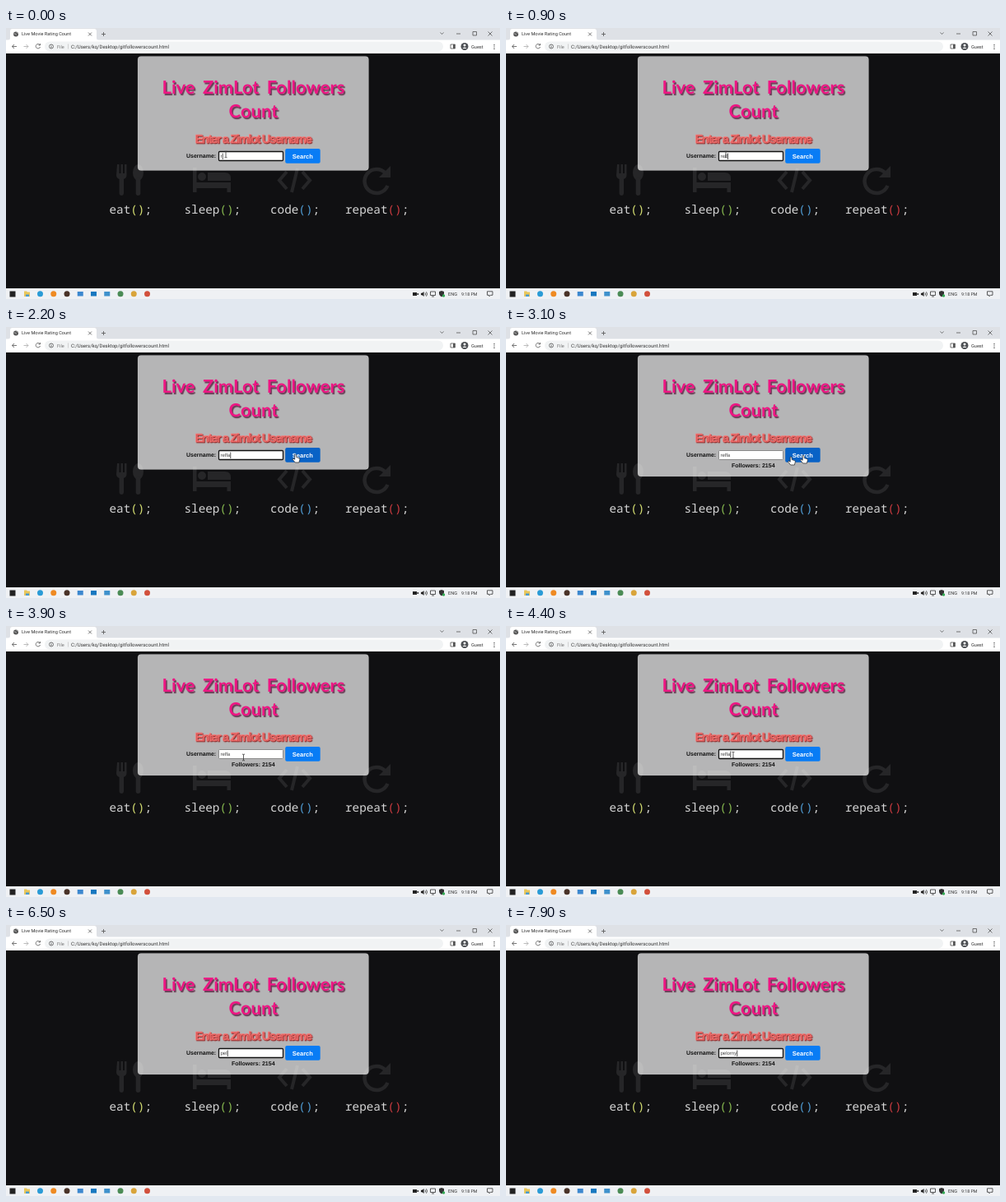
Recreate the animation shown at these times as an HTML page. Size 600 by 330 pixels, loop 8 s.

```html
<!DOCTYPE html>
<html lang="en">
<head>
<meta charset="utf-8">
<title>Followers count</title>
<style>
  html, body { margin: 0; width: 100%; height: 100%; overflow: hidden; background: #101012; }
  svg { display: block; width: 600px; height: 330px; text-rendering: geometricPrecision; }
  text { white-space: pre; }
  .ui { font: 5.6px Roboto, sans-serif; fill: #333; }
  .line { fill: none; stroke: #555; stroke-width: .8; }
  .title { font: 700 22px Lato, sans-serif; word-spacing: 4px; fill: #ee1583; text-anchor: middle;
           text-shadow: 1.5px 1.5px 1px #6a3a55; }
  .prompt { font: 700 14.5px "Liberation Sans", sans-serif; letter-spacing: -1.3px; fill: #ff7a78;
            stroke: #ff7a78; stroke-width: .4; text-shadow: 1px 1px 1px #8c2020; }
  .bold { font: 700 7px "Liberation Sans", sans-serif; fill: #111; }
  .typed { font: 6px "Liberation Sans", sans-serif; fill: #444; }
  .code { font: 14.3px "Noto Sans Mono", monospace; fill: #d6d6d6; }
  .icon { fill: #262628; }
  .stroke { fill: none; stroke: #262628; stroke-width: 4.5; }
</style>
</head>
<body>
<svg viewBox="0 0 600 330">
  <defs>
    <path id="hand" d="M-.8-4.5Q.2-5.4 1-4.3L1.3-1.4 4.5-.4Q5.6 0 5.3 1.4L4.4 5H-.3L-3.4 1.2Q-3.5 0-2.2.3L-.8 1.3Z"
      fill="#fff" stroke="#222" stroke-width=".7"/>
    <path id="beam" d="M-1.5-3.8H-.4L0-3.3.4-3.8H1.5M0-3.3V3.3M-1.5 3.8H-.4L0 3.3.4 3.8H1.5"
      fill="none" stroke="#333" stroke-width=".8"/>
  </defs>

  <!-- wallpaper -->
  <rect y="30" width="600" height="288" fill="#101012"/>
  <g class="icon">
    <path d="M135 166h2.5v11h2v-11h2.5v11h2v-11h2.5v13q0 4-3.5 5v17q0 3-2.7 3t-2.7-3v-17q-3.6-1-3.6-5Z"/>
    <ellipse cx="160.5" cy="176" rx="6.5" ry="10"/>
    <rect x="157.7" y="182" width="5.6" height="22" rx="2.7"/>
    <path d="M227 170h4.5v18h41.5v12h-4.5v-5h-37v5H227Z"/>
    <circle cx="238" cy="181" r="5"/>
    <path d="M245 176h21q7 0 7 7v3h-28Z"/>
    <path d="M467 168v14h-14Z"/>
  </g>
  <g class="stroke">
    <path d="M341 175l-9 10.500 9 10.500M360 175l9 10.500-9 10.500M354 171l-7 29" stroke-width="4"/>
    <path d="M461 177A14.5 14.5 0 1 0 463.5 192"/>
  </g>
  <g class="code">
    <text x="125.5" y="226">eat<tspan fill="#d5df72">()</tspan>;</text>
    <text x="216.5" y="226">sleep<tspan fill="#86b84f">()</tspan>;</text>
    <text x="321" y="226">code<tspan fill="#4f9bd2">()</tspan>;</text>
    <text x="412" y="226">repeat<tspan fill="#c93b40">()</tspan>;</text>
  </g>

  <!-- card -->
  <rect id="card" x="160" y="34.5" width="280.5" height="139" rx="4" fill="#fff" fill-opacity=".69"
    stroke="#fff" stroke-opacity=".2" stroke-width=".6"/>
  <text class="title" x="300.5" y="80.4">Live ZimLot Followers</text>
  <text class="title" x="300.5" y="109">Count</text>
  <text class="prompt" x="229.500" y="139.5">Enter a Zimlot Username</text>
  <text class="bold" x="219" y="158.2">Username:</text>
  <rect id="field" x="258.5" y="150.5" width="78" height="11" rx="1" fill="#fff"/>
  <rect id="selection" x="260.5" y="152.5" height="7.5" fill="#e2eefb"/>
  <text id="typed" class="typed" x="260.5" y="158.2"></text>
  <rect id="caret" y="152.5" width=".7" height="7.5"/>
  <rect id="button" x="339.2" y="147" width="42.5" height="17.8" rx="2"/>
  <text class="bold" x="347.8" y="158.5" style="font-size:7.5px;fill:#fff">Search</text>
  <text id="result" class="bold" x="274" y="171.3">Followers: 2154</text>

  <!-- browser -->
  <rect width="600" height="15" fill="#dee1e6"/>
  <path d="M2 15q3 0 3-3V4q0-3 3-3h99q3 0 3 3v8q0 3 3 3Z" fill="#fff"/>
  <rect y="14.5" width="600" height="16.5" fill="#fff"/>
  <rect x="47" y="16.5" width="484" height="12" rx="6" fill="#f1f3f4"/>
  <circle cx="12" cy="7.5" r="3" fill="#555"/>
  <path d="M9.5 7h2l1 1.5M12.5 5l2 1.5" stroke="#ddd" stroke-width=".7" fill="none"/>
  <g class="line">
    <path d="M100 5.5l4 4m0-4l-4 4M116 7.5h5m-2.500-2.500v5"/>
    <path d="M527.5 5.5l2 2 2-2M547 7h5M567 4.5h4.5v4.5H567ZM585.5 4.5l5 5m0-5l-5 5"/>
    <path d="M13 22.5H7.5m2.5-2.500l-2.500 2.500 2.500 2.500"/>
    <path d="M21.5 22.5H27m-2.500-2.500l2.500 2.500-2.500 2.500" stroke="#aaa"/>
    <path d="M41 20.5a2.7 2.7 0 1 0 .5 2.5M41.5 19v2h-2"/>
    <circle cx="55" cy="22.5" r="2.5"/><path d="M55 22v2M55 20.8v.5"/>
    <path d="M75.5 19.5v6" stroke="#bbb" stroke-width=".6"/>
    <path d="M540 20h5.5v5H540Z"/><path d="M544 20v5" stroke-width="2"/>
  </g>
  <circle cx="557" cy="22.5" r="4.5" fill="#4c4f53"/>
  <circle cx="557" cy="21" r="1.5" fill="#fff"/><path d="M554.3 25q2.7-3 5.4 0Z" fill="#fff"/>
  <path d="M593 20v6" stroke="#444" stroke-width="1.2" stroke-dasharray="1.2 1.2"/>
  <text class="ui" x="19" y="9.3">Live Movie Rating Count</text>
  <text class="ui" x="62" y="24.5" style="fill:#777">File</text>
  <text class="ui" x="79" y="24.5" style="font-size:6px">C:/Users/kq/Desktop/gitfollowerscount.html</text>
  <text class="ui" x="565" y="24.5">Guest</text>

  <!-- taskbar -->
  <rect y="317" width="600" height="13" fill="#eff1f4"/>
  <rect x="4.5" y="320.5" width="7" height="7" fill="#222"/>
  <path d="M22 320.5h3l1 1h3v5.5h-7Z" fill="#e8c65a"/>
  <path d="M24 324.5h4v2.500h-4Z" fill="#4b9bd0"/>
  <g id="apps"></g>
  <path d="M494 322h5v4h-5ZM499.5 323h1.5v2h-1.500Z" fill="#222"/>
  <path d="M504 322.7h1.5l2-1.7v6l-2-1.700H504Z" fill="#222"/>
  <g class="line" style="stroke:#333">
    <path d="M509 322.5q1 1.5 0 3M510.5 321.3q2 2.7 0 5.4"/>
    <path d="M515.5 321h6v4.5h-6ZM517 327h3"/>
    <path d="M584.5 320.8h6.5v4.5h-2.500l-1.500 1.500v-1.500h-2.500Z"/>
  </g>
  <path d="M526 321l3-1 3 1v3q-1 2.5-3 3.5-2-1-3-3.500Z" fill="#333"/>
  <circle cx="531.5" cy="326" r="1.7" fill="#32a852"/>
  <text class="ui" x="537" y="326">ENG</text>
  <text class="ui" x="553" y="326" style="font-size:5.3px">9:18 PM</text>

  <use id="trail" href="#hand" x="361" y="161"/>
  <use id="pointer"/>
</svg>
<script>
  const LOOP = 8000;
  const $ = id => document.getElementById(id);
  const show = (id, on) => $(id).setAttribute('visibility', on ? 'visible' : 'hidden');
  const set = (id, attrs) => { for (const k in attrs) $(id).setAttribute(k, attrs[k]); };

  const appColors = ['#2a9bd6', '#ef8a22', '#4a3328', '#3d88cf', '#1878c0', '#3f91cc', '#4b8b55', '#d9a43a', '#d2503c'];
  $('apps').innerHTML = appColors.map((fill, i) => {
    const x = 41.5 + i * 16.25;
    return i > 2 && i < 6
      ? `<rect x="${x - 3.5}" y="321" width="7" height="5.5" fill="${fill}"/>`
      : `<circle cx="${x}" cy="323.8" r="3.5" fill="${fill}"/>`;
  }).join('');

  const firstName = 'relfa', secondName = 'pelorny';
  const firstKeys = [0, 300, 600, 800, 1100];
  const secondKeys = [5700, 6000, 6300, 6700, 7100, 7400, 7700];
  const pressed = (keys, t) => keys.filter(k => k <= t).length;

  // time, x, y
  const path = [
    [0, 267, 154], [1200, 267, 154], [1900, 351.5, 160], [2500, 351.5, 160],
    [2900, 361, 161], [3100, 346, 163], [3500, 310, 162], [3900, 288.5, 160],
    [4500, 275, 157], [4900, 273, 156], [5400, 261, 156], [8000, 261, 156]
  ];
  function pointerAt(t) {
    const i = path.findIndex(p => p[0] > t);
    const [t0, x0, y0] = path[i - 1], [t1, x1, y1] = path[i];
    const u = (t - t0) / (t1 - t0), e = u * u * (3 - 2 * u);
    return [x0 + (x1 - x0) * e, y0 + (y1 - y0) * e];
  }

  function draw(now) {
    const t = now % LOOP;
    const retyping = t >= secondKeys[0];
    $('typed').textContent = retyping
      ? secondName.slice(0, pressed(secondKeys, t))
      : firstName.slice(0, pressed(firstKeys, t));
    const textEnd = 260.5 + $('typed').getComputedTextLength();

    const focused = t < 2500 || t >= 4300;
    set('field', { stroke: focused ? '#111' : '#777', 'stroke-width': focused ? 1.3 : .8 });

    // The caret stays at the text's end while the selection grows to the left.
    const [x, y] = pointerAt(t);
    const selecting = t >= 4900 && !retyping;
    const start = Math.min(textEnd, Math.max(260.5, x));
    set('selection', { x: start, width: selecting ? textEnd - start : 0 });
    set('caret', { x: textEnd + .3, fill: selecting ? '#4a9ae8' : '#111' });
    show('caret', focused);

    const found = t >= 2800;
    set('card', { height: found ? 147.5 : 139 });
    show('result', found);

    const hover = x > 339 && x < 382 && y > 147 && y < 165;
    set('button', { fill: hover ? '#0862c6' : '#087cf5' });
    set('pointer', { href: hover ? '#hand' : '#beam', x, y });
    show('pointer', !retyping);
    show('trail', t >= 3000 && t < 3300);
    requestAnimationFrame(draw);
  }
  requestAnimationFrame(draw);
</script>
</body>
</html>
```
